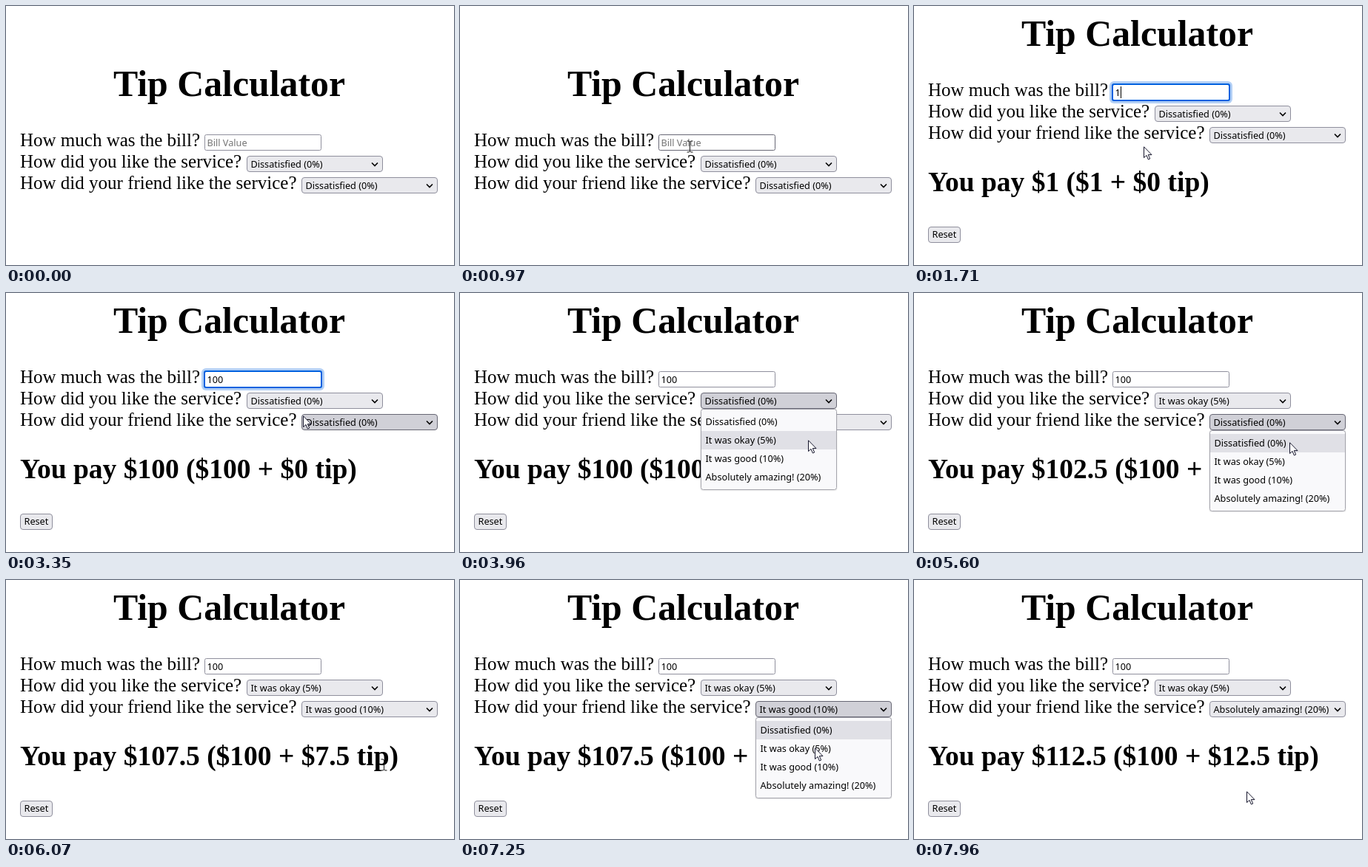
These frames come from a looping animation (605 px wide and 351 px high, 8000 ms). An HTML page:

```html
<!DOCTYPE html>
<html lang="en">
<head>
<meta charset="utf-8">
<title>Tip Calculator</title>
<style>
html, body { margin: 0; width: 100%; height: 100%; overflow: hidden; background: #fff; }
svg { display: block; }
text { font: 25px "Liberation Serif", serif; white-space: pre; }
.h1 { font-size: 49.8px; font-weight: bold; text-anchor: middle; }
.h2 { font-size: 37.5px; font-weight: bold; }
.ui { font: 12.7px "Noto Sans", sans-serif; }
</style>
</head>
<body>
<svg id="stage" width="605" height="351" viewBox="0 0 605 351"></svg>
<script>
const LOOP = 8000, ENTER = 400, FOCUS = 1110;
const stage = document.getElementById("stage");
const names = ["Dissatisfied", "It was okay", "It was good", "Absolutely amazing!"];
const percents = [0, 5, 10, 20];
const label = i => `${names[i]} (${percents[i]}%)`;

const selects = [{ x: 325, y: 135 }, { x: 399, y: 164 }];
const typed = [1660, 1940, 2090];
const popups = [
  { id: 0, open: 3630, close: 4140, pick: 1 },
  { id: 1, open: 5400, close: 5880, pick: 2 },
  { id: 1, open: 7060, close: 7560, pick: 3 }
];

// Pointer moves: start time, end time, destination
const home = { x: 452, y: 346 };
const moves = [
  [ENTER, 970, 310, 190],
  [3110, 3490, 440, 156],
  [3630, 3960, 470, 199],
  [4100, 4580, 509, 221],
  [5040, 5300, 505, 176],
  [5450, 5830, 510, 250],
  [6070, 6260, 506, 271],
  [6580, 6870, 490, 176],
  [7060, 7440, 469, 278],
  [7560, 7960, 449, 286]
];

const ease = u => u * u * (3 - 2 * u);
const clamp = (v, lo, hi) => Math.min(hi, Math.max(lo, v));
const inside = (p, x, y, w, h) => p.x >= x && p.x < x + w && p.y >= y && p.y < y + h;

function pointer(t) {
  return moves.reduce((p, [start, end, x, y]) => {
    const u = ease(clamp((t - start) / (end - start), 0, 1));
    return { x: p.x + (x - p.x) * u, y: p.y + (y - p.y) * u };
  }, home);
}

const text = (x, y, s, cls = "", fill = "#000") => `<text x="${x}" y="${y}" class="${cls}" fill="${fill}">${s}</text>`;
const rect = (x, y, w, h, r, fill, extra = "") =>
  `<rect x="${x}" y="${y}" width="${w}" height="${h}" rx="${r}" fill="${fill}" ${extra}/>`;
const box = (x, y, w, h, r, fill, line = "#8f8f9d") =>
  rect(x + .5, y + .5, w - 1, h - 1, r, fill, `stroke="${line}"`);

function select({ x, y }, value, hot) {
  return box(x, y, 184, 22, 3.5, hot ? "#d0d0d7" : "#e9e9ed", hot ? "#676774" : "#8f8f9d") +
    text(x + 5.5, y + 16, label(value), "ui") +
    `<path d="M${x + 169} ${y + 9.5}l4 4l4-4" fill="none" stroke="#000" stroke-width="1.6"/>`;
}

function input(bill, focus, hot, caret) {
  const body = focus
    ? rect(264, 102, 166, 30, 6, "#0060df", 'opacity=".3"') +
      rect(267, 105, 160, 24, 3, "#0060df") + rect(269, 107, 156, 20, 1.5, "#fff")
    : box(268, 106, 158, 22, 2, "#fff", hot ? "#676774" : "#8f8f9d");
  const line = caret ? rect(272 + 7 * bill.length, 109, 1, 16, 0, "#000") : "";
  return body + text(271.5, 122, bill || "Bill Value", "ui", bill ? "#000" : "#757575") + line;
}

function popup({ x, y }, active) {
  return rect(x - .5, y + 22, 185, 111, 3.5, "#000", 'opacity=".08"') +
    box(x, y + 22, 184, 110, 3, "#f9f9fb", "#a5a5ad") +
    rect(x + 1, y + 27 + 25 * active, 182, 25, 0, "#e0e0e6") +
    names.map((_, i) => text(x + 6.5, y + 44 + 25 * i, label(i), "ui")).join("");
}

function cursor(p, beam) {
  const shape = beam
    ? `<path d="M-4 -7.5H-1.5L0 -6.5L1.5 -7.5H4M0 -6.5V6.5M-4 7.5H-1.5L0 6.5L1.5 7.5H4" fill="none" stroke="#111"/>`
    : `<path d="M.5 .8V15.6L4 12.4L6.4 18L8.7 17L6.3 11.6H11Z" fill="#fff" stroke="#14142b"/>`;
  const off = beam ? .5 : 0;
  return `<g transform="translate(${Math.round(p.x) + off} ${Math.round(p.y) + off})">${shape}</g>`;
}

function scene(t) {
  const bill = "100".slice(0, typed.filter(k => k <= t).length);
  const picks = selects.map((_, id) =>
    popups.reduce((v, o) => o.id === id && t >= o.close ? o.pick : v, 0));
  const open = popups.find(o => t >= o.open && t < o.close);
  const shift = bill ? 0 : 68;
  const mouse = pointer(t), p = { x: mouse.x, y: mouse.y - shift };
  const shown = t >= ENTER;
  const focus = t >= FOCUS && t < popups[0].open;
  const caret = focus && (t < 2230 || Math.floor((t - 2240) / 500) % 2 === 1);
  const overInput = shown && !open && inside(p, 268, 106, 158, 22);
  const hot = (s, id) => open ? open.id === id : shown && inside(p, s.x, s.y, 184, 22);

  let s = `<g transform="translate(0 ${shift})">` +
    text(301.5, 54, "Tip Calculator", "h1") +
    text(19, 122, "How much was the bill?") +
    text(19, 151, "How did you like the service?") +
    text(19, 180, "How did your friend like the service?") +
    input(bill, focus, overInput, caret) +
    selects.map((pos, id) => select(pos, picks[id], hot(pos, id))).join("") + "</g>";

  let payWidth = 0;
  if (bill) {
    const tip = bill * (percents[picks[0]] + percents[picks[1]]) / 200;
    const pay = `You pay $${+bill + tip} ($${bill} + $${tip} tip)`;
    payWidth = pay.length * 17;
    s += text(19, 251, pay, "h2") + box(19, 299, 44, 22, 3.5, "#e9e9ed") + text(24.5, 314, "Reset", "ui");
  }
  if (open) {
    // The highlight trails the pointer slightly
    const pos = selects[open.id];
    const row = Math.floor((pointer(t - 60).y - pos.y - 27) / 25);
    s += popup(pos, row < 0 ? picks[open.id] : Math.min(row, 3));
  }
  if (shown) {
    const overText = inside(p, 19, 101, 242, 29) || inside(p, 19, 130, 299, 29) ||
      inside(p, 19, 159, 373, 28) || inside(p, 19, 217, payWidth, 43);
    s += cursor(mouse, !open && (overInput || overText));
  }
  return s;
}

let last = "";
function frame() {
  const s = scene(performance.now() % LOOP);
  if (s !== last) stage.innerHTML = last = s;
  requestAnimationFrame(frame);
}
frame();
</script>
</body>
</html>
```
